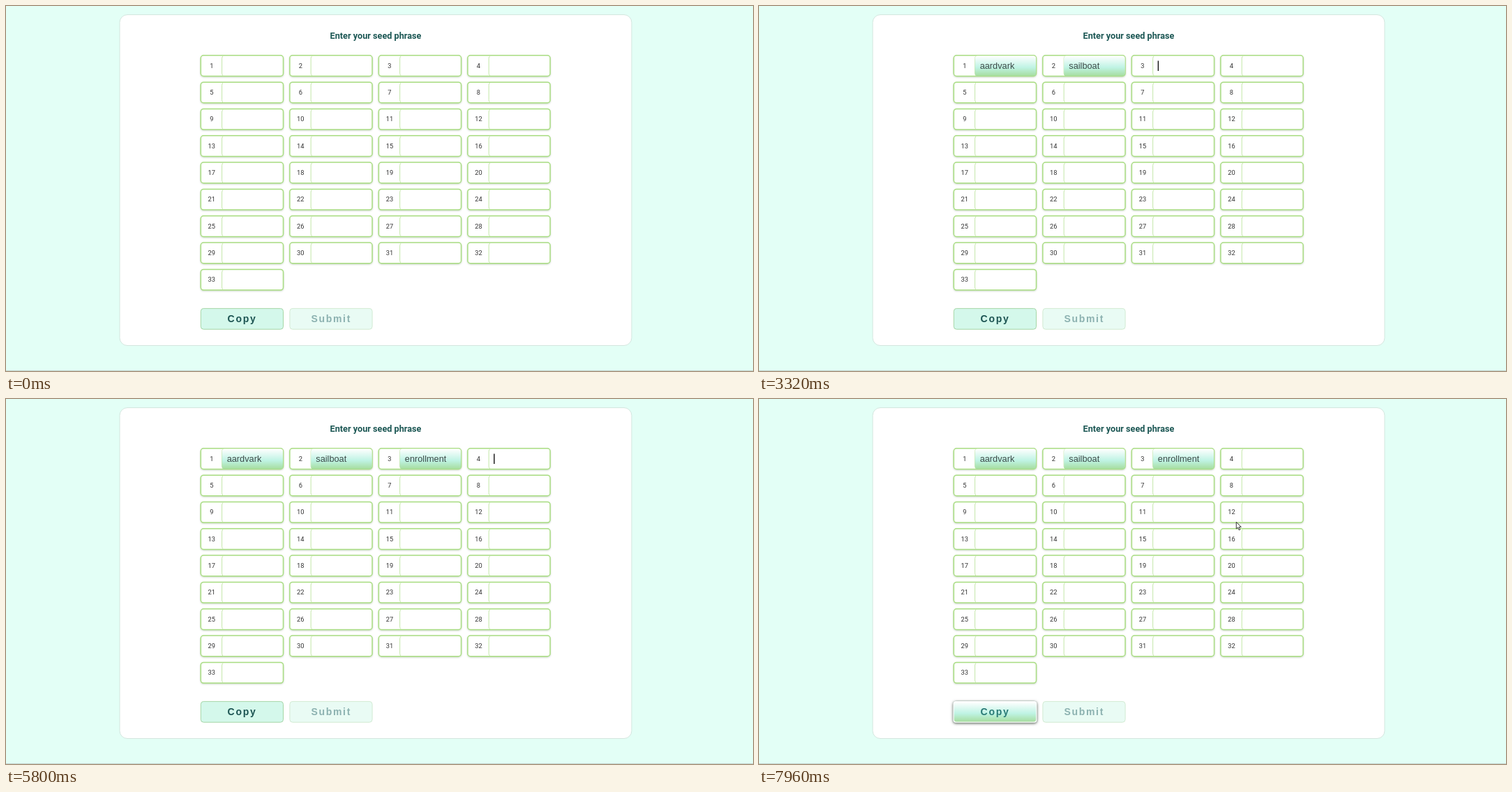
Write an HTML page that moves like this. It is 1071 px wide and 523 px high and loops after 8000 ms.

```html
<!DOCTYPE html>
<html lang="en">
<head>
<meta charset="utf-8">
<title>Seed phrase</title>
<style>
  html, body { margin: 0; width: 100%; height: 100%; overflow: hidden; background: #e3fff6; }
  svg { display: block; width: 1071px; height: 523px; }
  text { font-family: Roboto, sans-serif; }
  .num { font-size: 9.3px; fill: #333; text-anchor: middle; }
  .word { font: 12.75px "Liberation Sans", Arial, sans-serif; fill: #3d4a48; }
  .typed { font: 12.75px "Liberation Sans", Arial, sans-serif; fill: #111; }
  .item { font-size: 12.8px; fill: #1c1c1c; }
  .button { font: bold 14px "Liberation Sans", Arial, sans-serif; letter-spacing: 1.7px; }
  .soft { filter: drop-shadow(0 1px 1.3px rgba(70, 110, 60, .28)); }
  .focus { filter: drop-shadow(0 1px 2px rgba(0, 0, 0, .55)); }
</style>
</head>
<body>
<svg id="stage" viewBox="0 0 1071 523">
  <defs>
    <linearGradient id="mint" x1="0" y1="0" x2="0" y2="1">
      <stop offset="0" stop-color="#fff"/>
      <stop offset=".58" stop-color="#bff3e4"/>
      <stop offset="1" stop-color="#a6dd9f"/>
    </linearGradient>
  </defs>
  <rect width="1071" height="523" fill="#e3fff6"/>
  <rect y="522" width="1071" height="1" fill="#c3d6cf"/>
  <rect x="163" y="12.5" width="734" height="474" rx="11" fill="#fff" stroke="#d3e6de"/>
  <text x="530" y="47.3" text-anchor="middle" font-size="12.7" font-weight="700" fill="#1c5754">Enter your seed phrase</text>
</svg>
<script>
const LOOP = 8000, ROW = 28.1, STEP = 66;
const svg = document.getElementById('stage');

function add(tag, attrs, parent = svg, text) {
  const node = document.createElementNS('http://www.w3.org/2000/svg', tag);
  for (const key in attrs) node.setAttribute(key, attrs[key]);
  if (text) node.textContent = text;
  return parent.appendChild(node);
}
const show = (node, on) => node.setAttribute('opacity', +on);
const clamp = v => Math.max(0, Math.min(1, v));
const ramp = (t, from, length) => clamp((t - from) / length);
const within = (t, from, to) => t >= from && t < to;
const smooth = v => v * v * (3 - 2 * v);
const mix = (a, b, v) => a + (b - a) * v;
const stepped = (t, from) => from + Math.floor((t - from) / STEP) * STEP;

const colX = c => 279.3 + c * 127.55;
const rowY = r => 70.8 + r * 38.33;

for (let i = 0; i < 33; i++) {
  const x = colX(i % 4), y = rowY(Math.floor(i / 4));
  add('rect', { x, y, width: 118.2, height: 29.6, rx: 4, fill: '#fff', stroke: '#a9dd82', 'stroke-width': 1.5, class: 'soft' });
  add('path', { d: `M${x + 32} ${y + 1}q-1.7 .5 -1.7 3.5v21q0 3 1.7 3.5`, fill: 'none', stroke: '#c3e7a8' });
  add('text', { x: x + 15.5, y: y + 18, class: 'num' }, svg, String(i + 1));
}

// Buttons
const copy = add('g', {});
const copyBase = add('rect', { x: 279.3, y: 433.4, width: 118.2, height: 29.8, rx: 4, fill: '#d4f8eb', stroke: '#a5d6a6' }, copy);
const copyHover = add('rect', { x: 278.4, y: 432.9, width: 120, height: 30.8, rx: 4, fill: '#cff8ec', stroke: '#dcebe4', class: 'soft' }, copy);
const copyDone = add('g', {}, copy);
add('rect', { x: 278.4, y: 432.9, width: 120, height: 30.8, rx: 4, fill: '#fff', class: 'focus' }, copyDone);
add('rect', { x: 279.6, y: 433.9, width: 117.6, height: 28.6, rx: 3.5, fill: 'url(#mint)' }, copyDone);
const copyText = add('text', { x: 317.6, y: 453, class: 'button' }, copy, 'Copy');
const submit = add('g', { opacity: .5 });
add('rect', { x: 406.9, y: 433.4, width: 118.2, height: 29.8, rx: 4, fill: '#d4f8eb', stroke: '#a5d6a6' }, submit);
add('text', { x: 437.4, y: 453, class: 'button', fill: '#1c6663' }, submit, 'Submit');

const entries = [
  { word: 'aardvark', focus: 990, type: 2070, done: 2270, thumb: 82,
    list: 'aardvark adroitness absurd adviser accrue aftermath acme aggregate adrift alkali adult' },
  { word: 'sailboat', focus: 2270, type: 2860, done: 3320, thumb: 56,
    list: 'sailboat sawdust scallion scenic scorecard sandalwood scotland sardonic seabird saturday select' },
  { word: 'enrollment', focus: 3320, type: 4310, done: 5800, thumb: 137,
    list: 'embezzle enchanting enrollment enterprise eating equation edict equipment egghead escapade eightball' },
  { word: '', focus: 5800, type: Infinity, done: 7220 }
];
const caretGaps = [[1540, 2000], [2790, 2860], [3850, 4310], [4840, 5360], [6340, 6870]];

function buildList(entry, x) {
  const menu = add('g', {});
  add('rect', { x: x + .5, y: 99.5, width: 86.5, height: 318.3, fill: '#fff', stroke: '#a3bd92' }, menu);
  entry.marks = [0, 1, 2].map(i =>
    add('rect', { x: x + 1, y: 100.3 + i * ROW, width: 73, height: ROW, fill: '#def1dc' }, menu));
  entry.list.split(' ').forEach((word, i) =>
    add('text', { x: x + 8.3, y: 119 + i * ROW, class: 'item' }, menu, word));
  add('rect', { x: x + 73.7, y: 100, width: 13, height: 317.3, fill: '#f1f1f1' }, menu);
  add('rect', { x: x + 74.5, y: 113, width: 11.3, height: entry.thumb, fill: '#c1c1c1' }, menu);
  add('path', { d: `M${x + 77} 108.7h6l-3-3.2z`, fill: '#a3a3a3' }, menu);
  add('path', { d: `M${x + 77} 408.6h6l-3 3.2z`, fill: '#404040' }, menu);
  return menu;
}

entries.forEach((entry, i) => {
  const x = colX(i) + 30.6;
  entry.ring = add('rect', { x: x - .2, y: 71.2, width: 87.8, height: 28.9, rx: 4, fill: '#fff', stroke: '#8fbd74', 'stroke-width': 1, class: 'focus' });
  entry.filled = add('g', {});
  if (entry.word) {
    add('rect', { x: x - .2, y: 71.4, width: 87.4, height: 28.8, rx: 3.5, fill: 'url(#mint)' }, entry.filled);
    add('text', { x: x + 6.8, y: 90, class: 'word' }, entry.filled, entry.word);
    entry.menu = buildList(entry, x - .1 + .6);
    entry.letter = add('text', { x: x + 6.8, y: 90, class: 'typed' }, svg, entry.word[0]);
  }
  entry.caretX = x + 6.7;
  entry.caret = add('rect', { y: 78.5, width: 1.4, height: 14.5, fill: '#111' });
});

const outline = { fill: '#fff', stroke: '#222', 'stroke-width': .9, 'stroke-linejoin': 'round' };
const arrow = add('path', { ...outline, d: 'M.3 .3V10L2.5 8 4.2 11.8 5.8 11.1 4.2 7.4H7.3Z' });
const hand = add('path', { ...outline, d: 'M-1 1.2a1 1 0 0 1 2 0V5l4.6 1q1.4.4 1.2 2l-.7 3.6-.6 2.8H-.4l-.7-2-2.6-3.6q-.3-1.5 1.1-1.3L-1 8.6ZM1 5v2.6M3 5.5v2.3M5 6v2' });

// Pointer stops: time, x, y
const stops = [[6400, 916, 524], [7080, 351, 461], [7150, 351.5, 462], [7360, 351.5, 453.8], [7500, 351.5, 453.8], [7960, 684, 176]];

function pointerAt(t) {
  for (let i = 1; i < stops.length; i++) {
    const [t0, x0, y0] = stops[i - 1], [t1, x1, y1] = stops[i];
    if (t < t1) {
      const v = smooth(ramp(t, t0, t1 - t0));
      return [mix(x0, x1, v), mix(y0, y1, v)];
    }
  }
  return stops[stops.length - 1].slice(1);
}

function drawEntry(entry, t) {
  const active = within(t, entry.focus, entry.done);
  const open = within(t, entry.type, entry.done);
  show(entry.ring, active ? ramp(stepped(t, entry.focus), entry.focus, 132) : 0);
  show(entry.filled, t >= entry.done);
  const blank = caretGaps.some(([from, to]) => within(t, from, to));
  show(entry.caret, active && !blank);
  const letterWidth = entry.word[0] === 's' ? 6.4 : 7.1;
  entry.caret.setAttribute('x', entry.caretX + (open ? letterWidth : 0));
  if (!entry.menu) return;
  show(entry.menu, open);
  show(entry.letter, open);
  const picks = entry.word === 'enrollment';
  const second = picks ? ramp(t, 4990, 200) : 0;
  const third = picks ? ramp(t, 5330, 210) : 0;
  [1 - second, second - third, third].forEach((level, i) => show(entry.marks[i], level));
}

function drawPointer(t) {
  const [x, y] = pointerAt(Math.max(stops[0][0], stepped(t, 7960)));
  const overCopy = within(t, 7080, 7960) && x > 278 && x < 399 && y > 432 && y < 464;
  show(arrow, t >= 6400 && !overCopy);
  show(hand, overCopy);
  for (const node of [arrow, hand]) node.setAttribute('transform', `translate(${x} ${y})`);
}

function drawCopy(t) {
  const hover = ramp(t, 7100, 150), done = ramp(t, 7430, 200);
  show(copyBase, 1 - hover);
  show(copyHover, hover);
  show(copyDone, done);
  const shade = [[28, 42], [84, 122], [82, 118]].map(([a, b]) => Math.round(mix(a, b, hover)));
  copyText.setAttribute('fill', `rgb(${shade})`);
}

function draw(t) {
  entries.forEach(entry => drawEntry(entry, t));
  drawCopy(t);
  drawPointer(t);
}

const start = performance.now();
function tick() {
  draw((performance.now() - start) % LOOP);
  requestAnimationFrame(tick);
}
tick();
</script>
</body>
</html>
```
